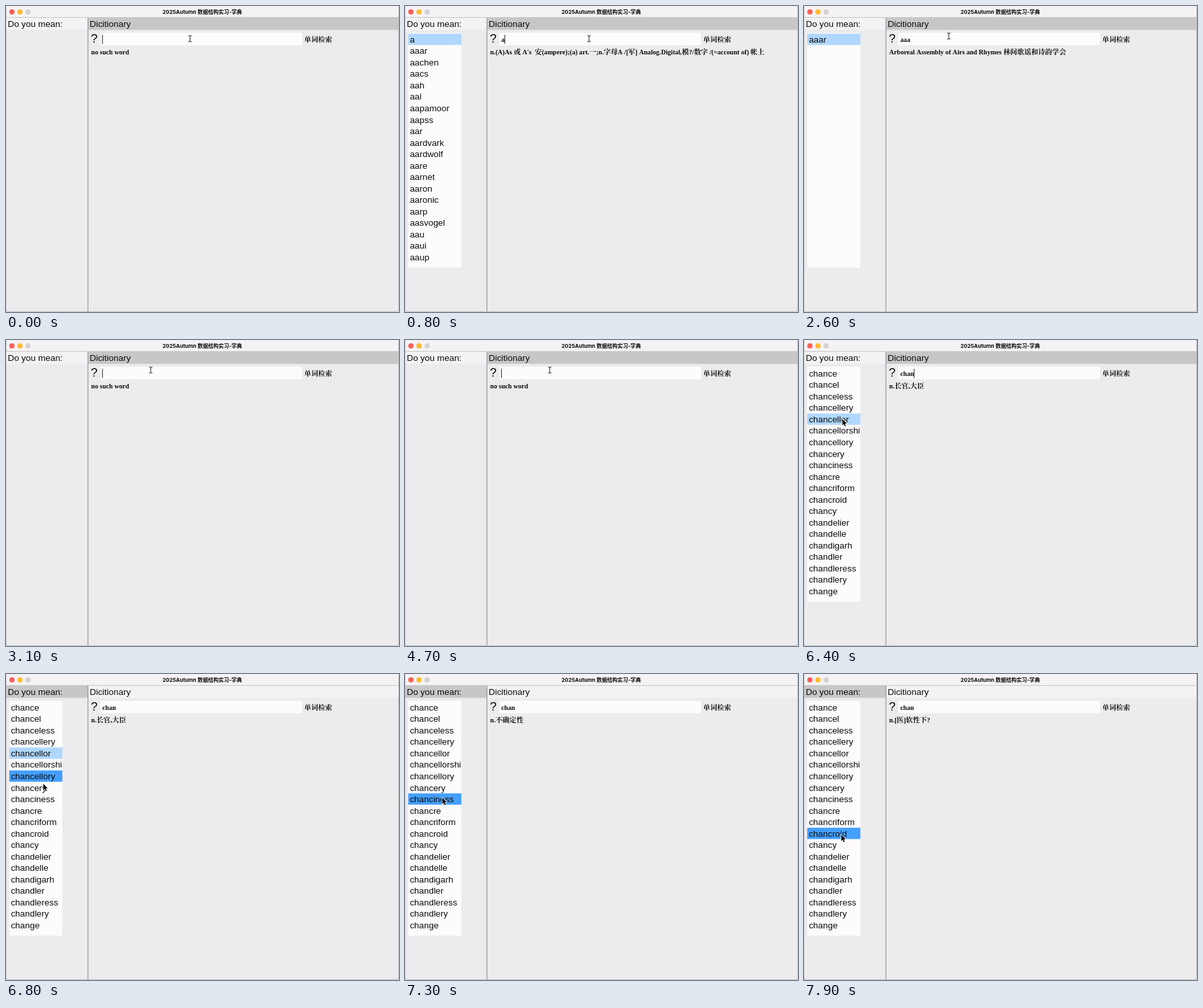
Recreate the animation shown at these times as an HTML page with a canvas. Size 600 by 468 pixels, loop 8000 ms.

```html
<!DOCTYPE html>
<html lang="zh">
<head>
<meta charset="utf-8">
<style>
  html, body { margin: 0; width: 600px; height: 468px; overflow: hidden; background: #ecebed; }
  canvas { display: block; }
</style>
</head>
<body>
<canvas id="stage" width="600" height="468"></canvas>
<script>
const ctx = document.getElementById('stage').getContext('2d');
const LOOP = 8000, ROW = 17.53;
const SANS = '"Liberation Sans", Arial, sans-serif';
const SERIF = '"Liberation Serif", Times, serif';
const HAN_SERIF = '"Noto Serif CJK SC", "Noto Sans CJK SC", "Noto Sans CJK", serif';
const HAN_SANS = '"Noto Sans CJK SC", "Noto Sans CJK", sans-serif';
const BOLD = ['bold 10.15px ' + SERIF, 'bold 10.67px ' + HAN_SERIF];
const TITLE = ['bold 8px Inter, sans-serif', 'bold 8px ' + HAN_SANS];

const words = s => s.split(' ');
const aWords = words('a aaar aachen aacs aah aal aapamoor aapss aar aardvark aardwolf aare aarnet aaron aaronic aarp aasvogel aau aaui aaup');
const chaWords = words('cha chace chaconne chad chador chafe chafer chaff chaffer chaffinch chaffy chafing chagrin chain chainman chair chairlift chairman chaise chalaza');
const lists = {
  a: aWords,
  aa: aWords.slice(1),
  aaa: ['aaar'],
  c: words('c ca cab cabal cabala caballero cabana cabaret cabbage cabbala cabby cabin cabinet cable cablegram cabman caboodle caboose cabotage cabriole'),
  ch: chaWords,
  cha: chaWords,
  chan: words('chance chancel chanceless chancellery chancellor chancellorship chancellory chancery chanciness chancre chancriform chancroid chancy chandelier chandelle chandigarh chandler chandleress chandlery change')
};
const meanings = {
  a: "n.(A)As 或 A's  安(ampere);(a) art.一;n.字母A /[军] Analog.Digital,模?/数字 /(=account of) 帐上",
  aaar: 'Arboreal Assembly of Airs and Rhymes 林间歌谣和诗韵学会',
  c: 'n.字母C,碳',
  cha: 'n.茶',
  chance: 'n.机会,可能性,偶然性,运气v.碰巧,偶然发生,冒...的险adj.偶然的',
  chancellor: 'n.长官,大臣',
  chancellory: 'n.大臣职位',
  chancery: 'n.大法官庭',
  chanciness: 'n.不确定性',
  chancre: 'n.[医]下疳',
  chancriform: 'a.下疳状的',
  chancroid: 'n.[医]软性下?'
};

// Timelines: [start ms, value]
const typing = [[0, ''], [300, 'a'], [1400, 'aa'], [2000, 'aaa'], [2700, 'aa'], [2900, 'a'], [3100, ''],
  [4800, 'c'], [4950, 'ch'], [5100, 'cha'], [5300, 'chan']];
const inactive = [[0, 0], [6300, 4], [6900, -1]];
const active = [[0, -1], [6700, 6], [7000, 7], [7300, 8], [7400, 9], [7500, 10], [7600, 11]];
const shown = [[0, 0], [6400, 4], [6900, 6], [7000, 7], [7300, 8], [7400, 9], [7500, 10], [7600, 11]];
const LIST_FOCUS = 6500;

// Pointer path: [ms, x, y]
const path = [[0, 281, 50], [1250, 281, 50], [2000, 245, 47], [2150, 232, 44], [2300, 221, 46], [5500, 221, 46],
  [6200, 60, 119], [6500, 58, 122], [6800, 57, 168], [7100, 57, 173], [7200, 57, 175], [7700, 57, 246], [LOOP, 57, 246]];

const at = (line, t) => line.findLast(e => e[0] <= t);

function pointerAt(t) {
  const i = path.findIndex(p => p[0] > t);
  const [t0, x0, y0] = path[i - 1], [t1, x1, y1] = path[i];
  const k = (t - t0) / (t1 - t0);
  return [x0 + (x1 - x0) * k, y0 + (y1 - y0) * k];
}

function box(x, y, w, h, color) {
  ctx.fillStyle = color;
  ctx.fillRect(x, y, w, h);
}

function text(s, x, y, font) {
  ctx.fillStyle = '#0c0c0c';
  ctx.font = font;
  ctx.fillText(s, x, y);
  return x + ctx.measureText(s).width;
}

// Latin and Chinese runs use separate fonts
function mixed(s, x, y, [latin, han]) {
  for (const run of s.match(/[\u4e00-\u9fff]+|[^\u4e00-\u9fff]+/g))
    x = text(run, x, y, run[0] >= '\u4e00' ? han : latin);
  return x;
}

function drawWindow(listFocused) {
  box(0, 0, 600, 468, '#ecebed');
  box(0, 0, 600, 17, '#f4f2f4');
  ['#ff5f57', '#febc2e', '#d3d1d3'].forEach((color, i) => {
    ctx.fillStyle = color;
    ctx.beginPath();
    ctx.arc(9 + i * 12.4, 9, 4, 0, 7);
    ctx.fill();
  });
  mixed('2025Autumn', 239, 11.6, TITLE);
  mixed('数据结构实习-字典', 292.5, 11.6, TITLE);
  const on = '#c8c7c8', off = '#f4f2f4';
  box(0, 18, 125, 18.5, listFocused ? on : off);
  box(126, 18, 474, 18.5, listFocused ? off : on);
  box(0, 17, 600, 1, '#c9c8c9');
  box(124.5, 18, 1.2, 450, '#969596');
  text('Do you mean:', 2.7, 32, '13.45px ' + SANS);
  text('Dicitionary', 127.7, 32, '13.45px ' + SANS);
  ctx.strokeStyle = '#b9b8ba';
  ctx.lineWidth = 1;
  ctx.beginPath();
  ctx.roundRect(0, -6, 599.6, 473.6, 4);
  ctx.stroke();
}

function drawList(items, light, dark) {
  ctx.save();
  ctx.beginPath();
  ctx.rect(5, 41, 81, 359);
  ctx.clip();
  box(5, 41, 81, 359, '#fdfbfe');
  const mark = (i, color) => i >= 0 && box(5, 42.3 + i * ROW, 81, 17.3, color);
  mark(light, '#b0d7ff');
  mark(dark, '#449fff');
  items.forEach((word, i) => text(word, 7.4, 55.8 + i * ROW, '13.4px ' + SANS));
  ctx.restore();
}

function drawPointer(x, y) {
  const overField = x > 144 && x < 452 && y > 41 && y < 60;
  ctx.beginPath();
  if (overField) {
    for (const s of [-1, 1]) {
      ctx.moveTo(x - 2.5, y + s * 4.8);
      ctx.quadraticCurveTo(x, y + s * 4.8, x, y + s * 3.5);
      ctx.quadraticCurveTo(x, y + s * 4.8, x + 2.5, y + s * 4.8);
    }
    ctx.moveTo(x, y - 4);
    ctx.lineTo(x, y + 4);
    ctx.strokeStyle = '#222';
    ctx.lineWidth = 1;
    ctx.stroke();
    return;
  }
  const shape = [[0, 0], [0, 9.5], [2.1, 7.5], [3.7, 11.2], [5.2, 10.5], [3.7, 6.9], [6.6, 6.8]];
  shape.forEach(([dx, dy]) => ctx.lineTo(x + dx, y + dy));
  ctx.closePath();
  ctx.strokeStyle = '#fff';
  ctx.lineWidth = 1.4;
  ctx.stroke();
  ctx.fillStyle = '#000';
  ctx.fill();
}

function draw(t) {
  const [since, typed] = at(typing, t);
  const listFocused = t >= LIST_FOCUS;
  drawWindow(listFocused);

  text('?', 129.6, 56, '18.5px ' + SANS);
  box(144, 41, 308, 19, '#fdfbfe');
  mixed('单词检索', 455.3, 54.8, BOLD);
  const end = typed ? mixed(typed, 147, 54.6, BOLD) : 147;
  const blinkOn = typed ? (t - since) % 900 < 600 : t < 4200 || t >= 4500;
  if (blinkOn && !listFocused) box(end - 0.2, 44, 1, 14, '#222');

  const items = lists[typed];
  if (items) drawList(items, at(inactive, t)[1], at(active, t)[1]);
  mixed(items ? meanings[items[at(shown, t)[1]]] : 'no such word', 130, 74.2, BOLD);
  drawPointer(...pointerAt(t));
}

const start = performance.now();
function tick() {
  draw((performance.now() - start) % LOOP);
  requestAnimationFrame(tick);
}
tick();
</script>
</body>
</html>
```
